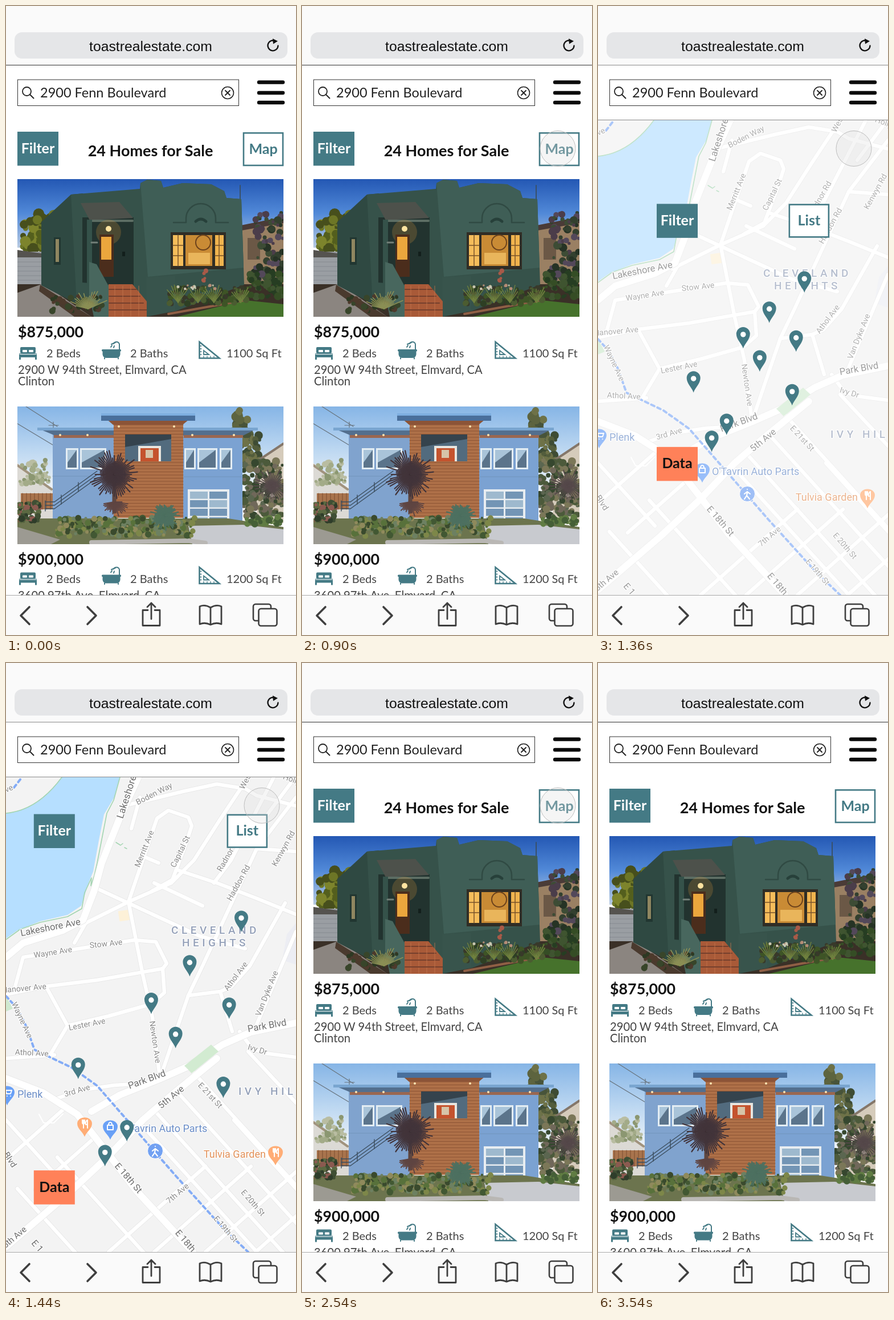
These frames come from a looping animation (509x1101 px, 4300 ms). An HTML page:

```html
<!DOCTYPE html>
<html lang="en">
<head>
<meta charset="utf-8">
<title>Home search</title>
<style>
html, body { margin: 0; height: 100%; overflow: hidden; background: #fff; }
#stage { display: block; width: 100%; height: 100%; font-family: Lato, sans-serif; }
.line { fill: none; stroke-linecap: round; stroke-linejoin: round; }
.mid { text-anchor: middle; }
.bold { font-weight: 700; }
.map text { font-family: Roboto, sans-serif; paint-order: stroke; stroke: #fff; stroke-width: 2.5px; stroke-linejoin: round; }
.map .area { font-weight: 500; font-size: 19px; letter-spacing: 5.5px; fill: #8492ae; }
</style>
</head>
<body>
<svg id="stage" viewBox="0 0 509 1101" preserveAspectRatio="none"></svg>
<script>
const LOOP = 4300, TEAL = '#447a85', ORANGE = '#ff8159', INK = '#3f3f3f';

// Markup helpers
const rect = (x, y, w, h, fill, more = '') => `<rect x="${x}" y="${y}" width="${w}" height="${h}" fill="${fill}" ${more}/>`;
const disc = (x, y, r, fill, more = '') => `<circle cx="${x}" cy="${y}" r="${r}" fill="${fill}" ${more}/>`;
const shape = (d, fill, more = '') => `<path d="M${d}Z" fill="${fill}" ${more}/>`;
const line = (d, color, width, more = '') => `<path class="line" d="M${d}" stroke="${color}" stroke-width="${width}" ${more}/>`;
const text = (s, x, y, size, fill, more = '') => `<text x="${x}" y="${y}" font-size="${size}" fill="${fill}" ${more}>${s}</text>`;
const group = (x, y, body) => `<g transform="translate(${x} ${y})">${body}</g>`;
const repeat = (n, fn) => Array.from({ length: n }, (_, i) => fn(i)).join('');
const gradient = (id, ...colors) => `<linearGradient id="${id}" x2="0" y2="1">` +
  colors.map((c, i) => `<stop offset="${i / (colors.length - 1)}" stop-color="${c}"/>`).join('') + '</linearGradient>';

let seed = 7;
const random = () => (seed = seed * 16807 % 2147483647) / 2147483647;
const foliage = (n, x, y, w, h, r, colors) => repeat(n, i =>
  disc(x + random() * w, y + random() * h, r * (.5 + random()), colors[i % colors.length]));
const spikes = (x, y, r, n, color, width, from = 0, to = 6.28) => repeat(n, i => {
  const a = from + (to - from) * i / n, len = r * (.5 + .5 * random());
  return line(`${x} ${y}l${len * Math.cos(a)} ${len * Math.sin(a)}`, color, width);
});

// Page pieces
const button = (label, solid) => (solid
  ? rect(0, 0, 72, 59.5, solid)
  : rect(1.5, 1.3, 69, 56.7, '#fff', `stroke="${TEAL}" stroke-width="2.6"`)) +
  text(label, 36, 37.5, 25, solid === TEAL ? '#fff' : solid ? '#111' : TEAL, 'class="mid bold"');

const icons = {
  bed: rect(25, 597, 27, 11, TEAL, 'rx="2"') + rect(23, 608, 31, 7, TEAL, 'rx="1"') +
    rect(23, 612, 3, 7, TEAL) + rect(51, 612, 3, 7, TEAL) +
    rect(29, 602, 8, 4, '#fff', 'rx="1"') + rect(40, 602, 8, 4, '#fff', 'rx="1"') + line('24 609.500h29', '#fff', 1),
  bath: rect(168, 601, 34, 3.500, TEAL, 'rx="1.5"') + shape('169.500 603h31v7q-1 6-7 6h-17q-6 0-7-6', TEAL) +
    line('173 616v1.500m24-1.500v1.500M199 601v-9q-1-4-5-4-4 0-5 3m-4 1l7-3M186 594l-2 3m6-2l-1 3', TEAL, 2),
  ruler: shape('339.5 588v28.5h35', 'none', `stroke="${TEAL}" stroke-width="2.6"`) +
    shape('347 603v7h9', 'none', `stroke="${TEAL}" stroke-width="1.8"`) +
    line('340 595h3m-3 5h3m-3 5h3m-3 5h3m4 6v-3m6 3v-3m6 3v-3m6 3v-3', TEAL, 1.3),
};

const details = (area, lines) => icons.bed + icons.bath + icons.ruler +
  text('2 Beds', 71, 615, 20, '#444') + text('2 Baths', 218, 615, 20, '#444') +
  text(area, 387, 615, 20, '#444') +
  lines.map((s, i) => text(s, 21, 644 + 20 * i, 20.2, '#444')).join('');

const photo = (y, body) => `<svg x="20" y="${y}" width="467" height="241" viewBox="20 ${y} 467 241">${body}</svg>`;

const greenHouse = () => photo(303,
  rect(20, 303, 467, 120, 'url(#dusk)') +
  foliage(70, 30, 364, 56, 62, 7, ['#6d7626', '#545f1d', '#7d842c', '#474f1c']) +
  rect(20, 430, 46, 60, '#9a9ea3') + shape('20 427l42 6v7h-42', '#55534f') +
  repeat(5, i => line(`20 ${448 + i * 8}h42`, '#858a90', 1)) +
  shape('413 384l74-12v115h-74', '#9a8063') + shape('412 384l75-15v11l-74 13', '#4a3b37') +
  rect(424, 406, 22, 38, '#6b5846') +
  foliage(80, 436, 362, 51, 125, 5, ['#33402f', '#4b3d4a', '#263325', '#53485a', '#3d4c35']) +
  line('411 314v35', '#38506a', 2) +
  rect(20, 487, 467, 60, '#3a3027') + shape('20 502l45-16 85 58h-130', '#8b8580') +
  shape('60 488l90 56h-30l-62-45', '#4a3a2e') +
  shape('62 378l52-48 21-2v199l-73-38', '#2f4942') +
  shape('114 330l121-10 1-10 12-6 24 2 4 12 34-8 50 2 23 12 4 12 26 2 5 150-120 46h-40l-134-12z', '#36524a') +
  shape('236 310l12-6 24 2 4 12 34-8 50 2 23 12 4 12 26 2 4 120-168 16', '#3f5e56') +
  shape('134 370h90v122l-90-8', '#22332f') + shape('131 345l68-2 24 28-76 4', '#4d514b') +
  line('146 376h76', '#5c6d63', 4) + rect(142, 374, 9, 116, '#35524a') +
  rect(84, 405, 12, 48, '#213631') + rect(87, 408, 6, 40, '#8f8660') +
  disc(180, 396, 22, '#d8963c', 'opacity=".22"') + disc(180, 390, 5, '#ffe3a0') +
  rect(164, 400, 25, 74, '#4b2d1c') + rect(167, 404, 18, 40, '#eba63d') +
  line('150 414h10', '#738079', 3) + rect(204, 430, 5, 8, '#131f1c') +
  rect(289, 396, 97, 65, '#302d25') + rect(293, 401, 18, 54, '#f5bd5b') +
  rect(315, 401, 47, 54, '#c98b35') + rect(367, 401, 15, 54, '#f0b44e') +
  disc(346, 414, 13, 'none', 'stroke="#6c421c" stroke-width="2"') + rect(320, 432, 38, 20, '#e9b55b') +
  line('302 401v54M293 419h18m-18 18h18M374 401v54M367 419h15m-15 18h15', '#79532a', 1.5) +
  line('294 379h22v-7a26 26 0 0 1 52 0v7h22', '#304a43', 2.5) + line('333 377q9-8 18 0', '#27403a', 5) +
  shape('180 487h42l25 30v27h-67', '#a95a38') +
  repeat(4, i => line(`181 ${496 + i * 12}h${48 + i * 6}`, '#75402d', 2) + line(`${191 + i * 14} 490v53`, '#c4784f', .8)) +
  shape('146 448l13 4 21 38v54h-26l-8-40', '#48675e') +
  shape('247 475l50-3v62l-50 10', '#38544c') +
  shape('300 544l120-29 67 7v24', '#46722c') + line('285 539l140-25', '#8f5f45', 4) +
  foliage(110, 285, 492, 140, 30, 4, ['#3e5426', '#4b5c31', '#2e3f24', '#38392a']) +
  foliage(60, 428, 468, 60, 42, 5, ['#354d25', '#263d22', '#3f5430']) +
  foliage(40, 80, 507, 90, 28, 4, ['#38452a', '#4d3a2c', '#2d3923']) +
  spikes(144, 530, 38, 20, '#8b8f55', 1.6, 3.4, 6) +
  [302, 337, 365, 412].map(x => spikes(x, 519, 32, 9, '#70813f', 1.4, 4, 5.5)).join('') +
  foliage(16, 294, 488, 78, 8, 2, ['#c8c6b1', '#b48c75']) + foliage(5, 345, 462, 6, 24, 3, ['#a85a48']));

const paneled = (x, w) => rect(x, 774, w, 37, '#e3edf3') + rect(x + 3, 777, w - 6, 31, '#5b748b') +
  shape(`${x + 3} 777h${w - 6}l${6 - w} 22`, '#a9c4d9');

const blueHouse = () => photo(701,
  rect(20, 701, 467, 150, 'url(#day)') +
  line('35 701l55 35M20 731l70 42M83 728v20m-8-14h17', '#68747e', 1.2) +
  foliage(90, 396, 745, 50, 65, 6, ['#535d3c', '#6e7248', '#3e4c34']) +
  foliage(35, 402, 708, 22, 50, 6, ['#5d643f', '#6e7248', '#48543a']) +
  shape('20 800l62 45v55h-62', '#dcdad5') + line('20 804l60 42', '#a1937e', 4) +
  foliage(50, 24, 795, 52, 42, 4, ['#a3ab88', '#8b9771', '#b9bda2']) +
  rect(26, 853, 58, 28, '#a9744d') + repeat(8, i => line(`${29 + i * 7} 853v28`, '#7b4f33', 1)) +
  shape('440 795l47-30v140h-47', '#d5cbbb') + line('436 800l51-34', '#85776a', 4) +
  foliage(190, 417, 795, 70, 98, 5, ['#4c5a3b', '#70685a', '#36472f', '#7b7758', '#5b6650']) +
  rect(82, 748, 110, 150, '#80a3ce') + rect(310, 748, 105, 165, '#7ba2d2') +
  shape('55 739h136v12h-107', '#536f8e') + rect(55, 738, 136, 5, '#79a5d0') +
  shape('311 739h131l-26 13h-105', '#536f8e') + rect(311, 738, 131, 5, '#79a5d0') +
  shape('84 751h106v5h-106zM312 751h104v5h-104', '#9a6750') +
  rect(189, 728, 122, 168, '#ae7048') +
  repeat(30, i => line(`189 ${733 + i * 5.5}h122`, '#8a5233', .9)) +
  shape('167 715h165l-22 18h-122', '#8c5437') + rect(167, 713, 165, 13, '#496f9c') + rect(167, 713, 165, 4, '#7daee0') +
  rect(209, 750, 81, 47, '#526b7e') + shape('209 750h81v8l-81 14', '#35434d') +
  rect(232, 770, 40, 27, '#e7e5df') + rect(236, 774, 32, 23, '#c4532e') + rect(245, 777, 13, 14, '#d6c4a8') +
  [95, 143, 198, 295, 327, 400].map(x => disc(x, x > 190 && x < 300 ? 736 : 751, 2, '#ffe4b1')).join('') +
  paneled(105, 22) + paneled(130, 46) + paneled(313, 20) + paneled(336, 35) + paneled(375, 22) +
  rect(319, 846, 73, 65, '#e8edf1') +
  repeat(8, i => rect(323 + (i % 2) * 34, 850 + (i >> 1) * 15, 31, 12.5, i % 3 ? '#7395b5' : '#9eb9ce')) +
  line('82 823h75M312 824h103', '#7094bc', 1) +
  repeat(3, i => line(`69 ${868 + i * 6}h16l75-54`, '#3b4d5d', 1.4)) + line('69 866v18m28-28v16m30-38v16', '#3b4d5d', 1.4) +
  shape('20 897h370l97 15v32h-467', '#6c744e') + shape('320 910l95-2 72 8v26h-160', '#c8cacf') +
  line('150 939l170-3 30 4', '#b9b7b4', 8) + shape('20 912l75 22-20 10h-55', '#9c9a92') +
  line('190 825v60', '#5f4740', 7) +
  spikes(190, 820, 44, 60, '#42343a', 2.2) + spikes(190, 868, 26, 22, '#5f4542', 2, 0, 3.1) +
  foliage(240, 88, 896, 245, 32, 4, ['#58713b', '#7d8749', '#425833', '#8f8a5c', '#6d8061', '#3a4a2d']) +
  foliage(60, 20, 870, 40, 34, 4, ['#3f4f34', '#8b5a50', '#5b6942', '#2f3d2a']) +
  spikes(279, 892, 26, 50, '#4d7060', 2.4) + foliage(40, 420, 894, 65, 14, 4, ['#607c43', '#455f37']) +
  spikes(467, 840, 32, 34, '#55484a', 1.8));

const listView = () => group(20, 220, button('Filter', TEAL)) + group(415.5, 221, button('Map')) +
  text('24 Homes for Sale', 253.5, 262.5, 27, '#111', 'class="mid bold"') +
  greenHouse() + text('$875,000', 21, 579.5, 26.8, '#111', 'class="bold"') +
  details('1100 Sq Ft', ['2900 W 94th Street, Elmvard, CA', 'Clinton']) +
  blueHouse() + text('$900,000', 21, 977.5, 26.8, '#111', 'class="bold"') +
  group(0, 394.5, details('1200 Sq Ft', ['3600 97th Ave, Elmvard, CA']));

// Map
const lanes = [
  '215 248L310 225 370 212 420 220 440 232 509 250M215 418L265 272 285 258 320 270 326 285 318 310 290 385',
  '160 395L210 418 340 478 420 500M130 460L215 418 290 385 330 345 375 275 425 200M300 362L370 385 440 412 509 440',
  '470 200L395 345 365 385M509 235L440 325 345 530 320 582 300 640 270 728M440 325L509 330M240 338L268 350M235 235L220 290',
  '120 490L140 455M0 580L70 566 160 555 275 535 282 526 263 488 225 485 30 515 15 570M215 418L240 545 257 620 270 725',
  '70 566L108 635 180 618 255 597 278 577 275 535M108 635L75 690M0 692L85 686M90 762L130 748 190 739 245 736',
  '320 582L376 575 395 567 428 530 490 420M376 575L397 645M509 470L436 642M410 645L432 675 455 683 509 690M425 680L509 770',
  '260 385L345 425M300 375L255 400M455 270L500 210',
];
const avenues = ['232 200L200 270 168 350 155 398 135 450 100 468 30 490 0 515',
  '509 630L430 646 380 668 320 706 270 728 200 756 150 785', '370 692L290 757 240 800 180 863 110 928 0 1022',
  '0 727L65 752 125 790 180 860 230 925 328 1031'];
const blocks = () => [0, 52, 180, 260, 350, 438].map(x =>
    `${x} ${x < 60 ? 870 + x : 1031}l${x < 60 ? '100-88' : '170-150'}`)
  .concat([[300, 750, 270], [262, 785, 230], [325, 712, 190], [235, 805, 205], [20, 920, 110], [90, 865, 160], [0, 800, 100], [400, 800, 115]]
    .map(([x, y, d]) => `${x} ${y}l${d} ${d * 1.1}`));

const labels = [
  ['Lakeshore', 217, 236, -72, 17], ['Lakeshore Ave', 79, 468, -11, 16.5], ['Park Blvd', 459, 640, -10, 16.5],
  ['Park Blvd', 249, 734, -20, 16.5], ['5th Ave', 293, 764, -39, 16], ['E 18th St', 211, 905, 49, 16],
  ['E 18th', 311, 1015, 49, 16], ['E 1', 51, 1024, 49, 16], ['5th Ave', 18, 1009, -40, 15], ['Blvd', 3, 872, 57, 15],
];
const smallLabels = [
  ['Boden Way', 262, 233, -27], ['Merritt Ave', 247, 327, -68], ['Capital St', 310, 332, -64], ['Radnor Rd', 394, 338, -60],
  ['Haddon Rd', 412, 387, -61], ['Kenwyn Rd', 491, 327, -61], ['West', 425, 208, -63], ['Holly', 500, 208, 20],
  ['Wayne Ave', 83, 511, -9], ['Stow Ave', 176, 496, -6], ['Hanover Ave', 32, 574, -5], ['Wayne Ave', 24, 627, 65],
  ['Lester Ave', 143, 637, -11], ['Newton Ave', 257, 664, 82], ['Athol Ave', 45, 687, 3], ['3rd Ave', 126, 753, -16],
  ['Athol Ave', 407, 551, -53], ['Van Dyke Ave', 462, 580, -68], ['Ivy Dr', 440, 681, 17], ['E 21st St', 355, 760, 47],
  ['7th Ave', 304, 932, -40], ['E 20th St', 430, 948, 49], ['E 19th St', 382, 994, 49], ['ve', 7, 224, -25],
];
const roadLabel = ([s, x, y, angle, size = 14]) =>
  text(s, 0, 0, size, size > 14 ? '#555' : '#777', `class="mid" transform="translate(${x} ${y}) rotate(${angle})"`);

const drop = 'M0 23.5C-3 14-12 8-12-2A12 12 0 0 1 12-2C12 8 3 14 0 23.5Z';
const poi = (x, y, color, glyph) => group(x, y, `<path d="${drop}" fill="${color}" transform="scale(1.08 .9)"/>` + line(glyph, '#fff', 2));
const fork = '-4-8v4q0 3 2 3t2-3v-4M-2-8v14M5 6v-14q-4 2-3 8h3';
const BLUE = '#5090f5', PEACH = '#ffa05f';

const cityMap = () => rect(0, 200, 509, 831, '#f1f1f1') +
  shape('0 263Q55 258 98 200H200L190 235 172 265 163 310 153 365 146 382 132 425 108 441 60 452 20 468 0 482', '#aadaff') +
  line('0 263Q55 258 98 200M200 200L189 240 177 263 160 350 155 372 149 390 150 376 138 402 133 430 108 444 60 454 25 466 0 484', '#94cfa4', 1.6) +
  line('193 314l8 5 4-3m3 7 4 2', '#94cfa4', 1.5) +
  shape('509 455l-16 20-8 45 24 8', '#e9ebf2') + rect(198, 433, 19, 18, '#fdefd2', 'transform="rotate(-8 208 442)"') +
  shape('0 583l12 22-12 5', '#c7e6c8') +
  [...lanes, ...blocks()].map(d => line(d, '#e2e2e2', 8)).join('') + [...lanes, ...blocks()].map(d => line(d, '#fff', 6.5)).join('') +
  line('58 790l8 15h18l16-16', '#fff', 2) +
  avenues.map(d => line(d, '#e4e4e4', 13.5)).join('') + avenues.map(d => line(d, '#fff', 12)).join('') +
  shape('313 705l47-37 13 12-47 38', '#cbe8ca') +
  line('0 583L20 605 35 635 50 677 115 708 160 740 230 820 300 900 380 988 425 1031M14 218l14-18', '#709ff5', 4, 'stroke-dasharray="6 6"') +
  labels.map(roadLabel).join('') + smallLabels.map(roadLabel).join('') +
  text('CLEVELAND', 367.5, 474, 19, '', 'class="area mid"') + text('HEIGHTS', 367.5, 496, 19, '', 'class="area mid"') +
  text('IVY HILL', 408, 756, 19, '', 'class="area"') +
  poi(2, 753, BLUE, '-6-7h3l2 8h7l2-6h-10M0 5h0m6 0h0') + poi(138, 808, PEACH, fork) + poi(473, 858, PEACH, fork) +
  poi(183, 813, BLUE, '-5-4h10v8h-10zM-3-4q0-5 3-5t3 5') +
  disc(262, 854, 13.5, '#5b92f0', 'stroke="#fff"') + line('262 846h0m0 5l-1 6-4 6m4-6 5 6m-9-9 5-4 5 4', '#fff', 2.2) +
  text('Plenk', 20, 761, 18, '#5079bd') + text("O'Tavrin Auto Parts", 200, 821, 18, '#5079bd') +
  text('Tulvia Garden', 456, 866, 18, '#dd7e3d', 'text-anchor="end"');

const chrome = () =>
  rect(0, 0, 509, 103, '#fafafa') + rect(15, 46, 479, 46, '#e5e6e8', 'rx="13"') +
  text('toastrealestate.com', 254, 78.5, 24.75, '#111', `class="mid" font-family="'Liberation Sans', Arial, sans-serif"`) +
  line('477.5 69.5a9 9 0 1 1-5-8.3', '#111', 2.3) + shape('468 57l9 4.500-8 5', '#111') +
  rect(20.5, 129, 388, 45.500, '#fff', 'stroke="#333"') +
  disc(36.500, 149.500, 7.500, 'none', 'stroke="#222" stroke-width="1.8"') + line('42 155l6.500 6.500', '#222', 2) +
  text('2900 Fenn Boulevard', 60, 160, 23.5, '#222') +
  disc(389, 152, 10.500, 'none', 'stroke="#222" stroke-width="1.6"') + line('385 148l8 8m0-8l-8 8', '#222', 1.9) +
  [133.500, 152, 169].map(y => line(`444 ${y}h42`, '#0b0b0b', 6.4)).join('') +
  rect(0, 1031, 509, 70, '#fafafa') + line('0 1031.500h509', '#aaa', 1) +
  line('41 1052l-15 15 15 15M143 1052l15 15-15 15', INK, 3.6) +
  line('249 1057.500h-9v27h30v-27h-9M255 1073v-28m-7 7l7-7 7 7', INK, 2.8) +
  line('359 1053q-10-6-19-2v31q9-4 19 1 10-5 19-1v-31q-9-4-19 2zv30', INK, 2.8) +
  rect(434, 1047, 31, 29, '#fafafa', `rx="4" stroke="${INK}" stroke-width="2.6"`) +
  rect(443.500, 1055, 32, 30, '#fafafa', `rx="4" stroke="${INK}" stroke-width="2.6"`);

// Each mover flies from the middle of the map to its resting place.
const pinSpots = [[440, 431], [334, 522], [255, 599], [415, 609], [305, 669], [403, 771], [205, 860], [160, 911], [105, 732]];
const movers = [
  { from: [222, 520], to: [415.500, 221], body: button('List') },
  { from: [218, 520], to: [20, 221], body: button('Filter', TEAL) },
  { from: [218, 525], to: [20, 950], body: button('Data', ORANGE) },
  ...pinSpots.map(to => ({ from: [254.500, 544], to, body: `<path d="${drop}" fill="${TEAL}"/>` + disc(0, -1, 4.700, '#fff') })),
];

const stage = document.getElementById('stage');
stage.innerHTML = `<defs>${gradient('dusk', '#2458b4', '#5189d8', '#b9cbe2')}${gradient('day', '#86b5e6', '#bcd7f1', '#f1f5f8')}</defs>` +
  rect(0, 0, 509, 1101, '#fff') + `<g id="list">${listView()}</g>
  <g id="map"><g id="city" class="map">${cityMap()}</g>${movers.map(m => `<g class="mover">${m.body}</g>`).join('')}${rect(0, 104, 509, 95.500, '#fff')}${line('0 199.500h509', '#8a8a8a', 1)}</g>` +
  chrome() + line('0 103.500h509', '', 1, 'id="rule"') +
  disc(0, 0, 31, 'rgba(222,222,222,.3)', 'id="touch" stroke="#bdbdbd" stroke-width="1"');

const [list, map, city, rule, touch] = ['list', 'map', 'city', 'rule', 'touch'].map(id => document.getElementById(id));
const moverNodes = [...document.querySelectorAll('.mover')];

const clamp = v => Math.min(1, Math.max(0, v));
const mix = (a, b, p) => a + (b - a) * p;
const smooth = p => p * p * (3 - 2 * p);
const place = (node, x, y) => node.setAttribute('transform', `translate(${x} ${y})`);

// cubic-bezier(.25, .1, .25, 1)
function ease(x) {
  const bezier = (a, b, s) => 3 * a * s * (1 - s) ** 2 + 3 * b * s * s * (1 - s) + s ** 3;
  let lo = 0, hi = 1;
  for (let i = 0; i < 24; i++) {
    const s = (lo + hi) / 2;
    if (bezier(.25, .25, s) < x) lo = s; else hi = s;
  }
  return bezier(.1, 1, lo);
}

const swing = [[340, 455], [580, 452], [780, 441], [900, 449]];
function touchAt(t) {
  if (t > 3140) {
    const p = smooth(clamp((t - 3140) / 400));
    return [mix(449, 486, p), mix(249.500, -33, p)];
  }
  let x = swing[0][1];
  for (let i = 1; i < swing.length; i++) {
    const [t0, x0] = swing[i - 1], [t1, x1] = swing[i];
    if (t >= t0) x = mix(x0, x1, smooth(clamp((t - t0) / (t1 - t0))));
  }
  return [x, mix(-33, 249.500, 1 - (1 - clamp((t - 330) / 520)) ** 2)];
}

function draw(now) {
  const t = now % LOOP, onMap = t >= 1240 && t < 2540;
  list.style.display = onMap ? 'none' : '';
  map.style.display = onMap ? '' : 'none';
  rule.setAttribute('stroke', onMap ? '#8a8a8a' : '#333');
  if (onMap) {
    const p = ease(clamp((t - 1240) / 360));
    city.setAttribute('opacity', p);
    movers.forEach(({ from, to }, i) => place(moverNodes[i], mix(from[0], to[0], p), mix(from[1], to[1], p)));
  }
  place(touch, ...touchAt(t));
  requestAnimationFrame(() => draw(performance.now()));
}
draw(performance.now());
</script>
</body>
</html>
```
